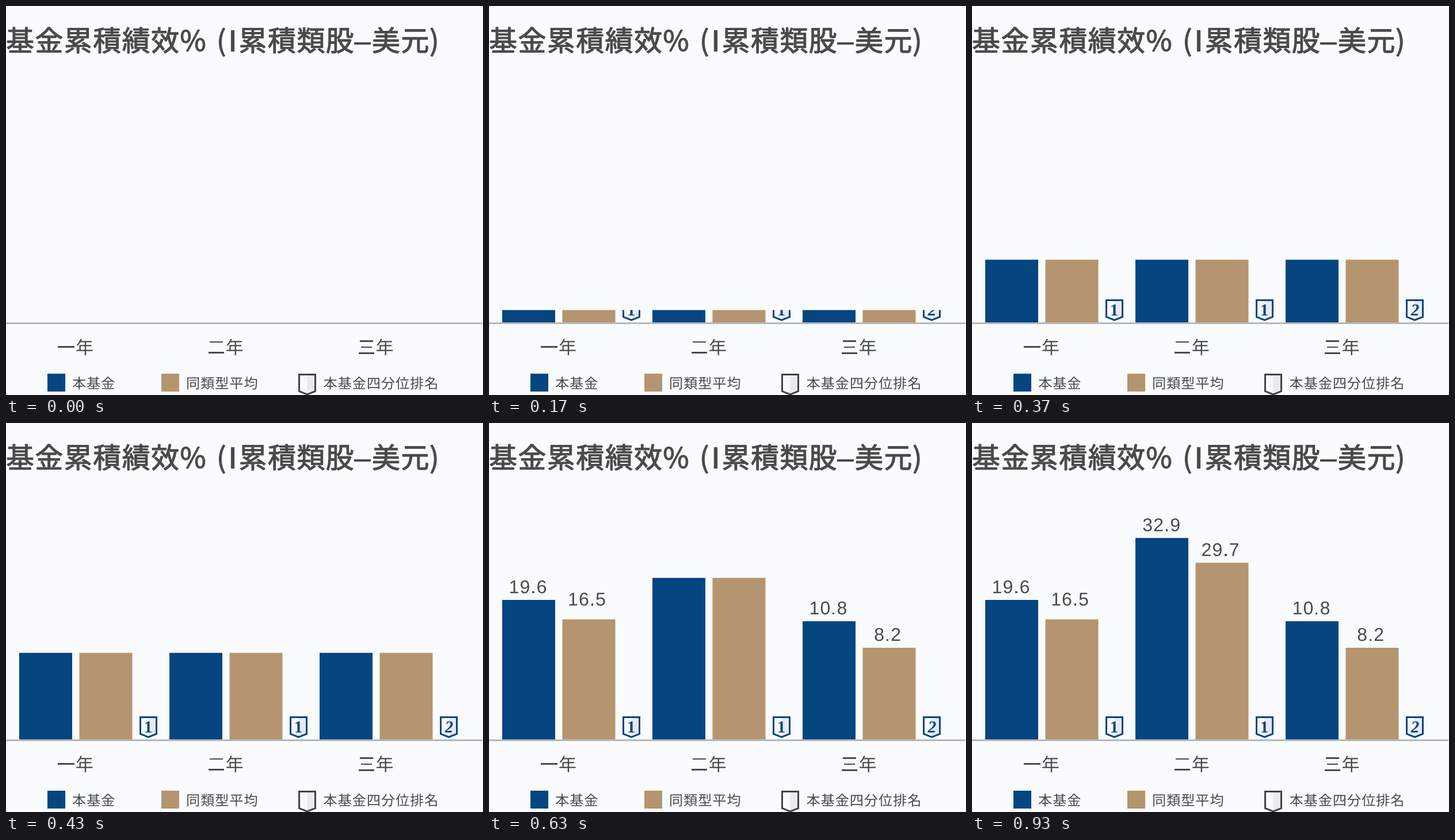
Animation, 829 px wide and 675 px high, one loop 1.03 s. Source, as a matplotlib script:

```python
import matplotlib.pyplot as plt
from matplotlib.animation import FuncAnimation
from matplotlib.patches import PathPatch, Polygon, Rectangle
from matplotlib.textpath import TextPath
from matplotlib.transforms import Affine2D

W, H, DPI = 829, 675, 100
PAPER, INK, BLUE, TAN = "#f9fbfd", "#4a4a4b", "#054580", "#b5956f"
CJK = dict(family="Noto Sans CJK JP")
SANS = dict(family="Liberation Sans")
AXIS_Y, TOP_Y = 549.5, 159.5
STEP, TICKS = 10, 103

# The tiny surplus keeps the pixel size from being rounded down
fig = plt.figure(figsize=((W + 1e-4) / DPI, (H + 1e-4) / DPI), dpi=DPI, facecolor=PAPER)
ax = fig.add_axes([0, 0, 1, 1])
ax.set_xlim(0, W)
ax.set_ylim(H, 0)
ax.axis("off")


def rect(x0, y0, x1, y1, color, z=1):
    patch = Rectangle((x0, y0), x1 - x0, y1 - y0, fc=color, lw=0, zorder=z, snap=False)
    return ax.add_patch(patch)


def advance(char, size, font):
    def right(s):
        return TextPath((0, 0), s, size=size, prop=font).get_extents().x1
    return right("l" + char + "l") - right("ll")


def write(text, x, y, size, track=0, font=CJK, color=INK, weight=0, center=False):
    """Set tracked text from pen x, or with its ink centred on x."""
    glyphs, pen = [], 0
    for char in text:
        glyphs.append(TextPath((pen, 0), char, size=size, prop=font))
        pen += advance(char, size, font) + track
    if center:
        x -= (glyphs[0].get_extents().x0 + glyphs[-1].get_extents().x1) / 2
    place = Affine2D().scale(1, -1).translate(x, y)
    for glyph in glyphs:
        ax.add_patch(PathPatch(place.transform_path(glyph), fc=color, ec=color,
                               lw=weight * 72 / DPI, zorder=2))


def badge(x, y, color, digit="", slant="normal"):
    left, right, mid = x + 1.5, x + 29.5, x + 15.5
    top, corner, tip = y + 1.5, y + 30.5, y + 36
    shape = [(left, top), (right, top), (right, corner), (mid, tip), (left, corner)]
    ax.add_patch(Polygon(shape, fc="#f8f9fb", lw=0))
    ax.add_patch(Polygon([(mid, top), *shape[1:4]], fc="#e8eaec", lw=0))
    ax.add_patch(Polygon(shape, fc="none", ec=color, lw=3 * 72 / DPI,
                         joinstyle="miter", snap=False))
    if digit:
        serif = dict(family="Liberation Serif", weight="bold", style=slant)
        write(digit, mid, y + 28, 29, font=serif, color=color, center=True)


def ease(x):
    """Cubic Bezier (0.42, 0, 0.58, 1), solved by bisection."""
    low, high = 0, 1
    for _ in range(30):
        t = (low + high) / 2
        if 1.26 * (1 - t) ** 2 * t + 1.74 * (1 - t) * t * t + t ** 3 < x:
            low = t
        else:
            high = t
    return 3 * t * t - 2 * t ** 3


# Heading
for part, x in (("基金累積績效%", 0), ("(", 366), ("I", 386.5),
                ("累積類股", 404.5), ("美元", 636), (")", 736)):
    write(part, x, 78, 49, 1.4, weight=1.2)
rect(605, 63, 634, 67, INK)

# Each group: name, badge digit and slant, then (value, bar top, label baseline)
groups = [
    ("一年", "1", "normal", ("19.6", 307, 295.3), ("16.5", 340.7, 316.7)),
    ("二年", "1", "normal", ("32.9", 199.5, 187.8), ("29.7", 242.5, 230.8)),
    ("三年", "2", "italic", ("10.8", 344, 332), ("8.2", 390, 378)),
]
for i, (name, digit, slant, *bars) in enumerate(groups):
    x = 23 + 261 * i
    write(name, x + 97.5, 603.5, 31, 0.8, center=True)
    for left, color, (value, top, base) in zip((x, x + 104.5), (BLUE, TAN), bars):
        rect(left, top, left + 92, AXIS_Y, color)
        write(value, left + (45 if color == BLUE else 43), base, 32, 1.2, SANS, center=True)
    badge(x + 209, 509, BLUE, digit, slant)

# Legend
rect(72, 638, 103, 669, BLUE)
rect(270, 638, 301, 669, TAN)
badge(508, 638, "#3f4346")
for label, x in (("本基金", 115), ("同類型平均", 313), ("本基金四分位排名", 551.5)):
    write(label, x, 663.5, 24.2, 0.9)

cover = rect(0, 100, W, AXIS_Y, PAPER, z=4)
rect(0, 549, 828, 552, "#b6b9bb", z=5)


def draw(tick):
    step = min(int((tick + 0.5) * 0.3), 28)
    edge = AXIS_Y + (TOP_Y - AXIS_Y) * ease(step / 30)
    cover.set_height(edge - 100)
    return [cover]


anim = FuncAnimation(fig, draw, frames=TICKS, interval=STEP, repeat=True,
                     repeat_delay=0, blit=False)
plt.show()
```
